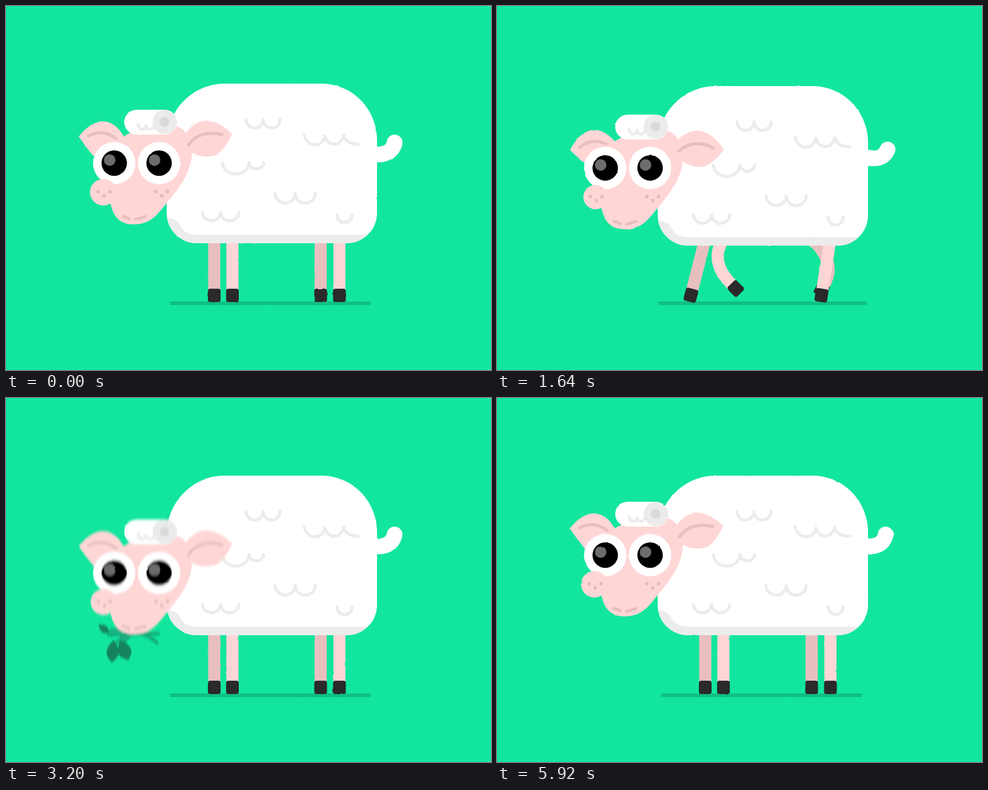
These frames come from a looping animation (800x600 px, 5960 ms). An HTML page:

```html
<!DOCTYPE html>
<html lang="en">
<head>
<meta charset="utf-8">
<title>Sheep</title>
<style>
  html, body { margin: 0; width: 100%; height: 100%; overflow: hidden; background: #12e69e; }
  svg { display: block; width: 800px; height: 600px; }
  .line { fill: none; stroke-linecap: round; stroke-linejoin: round; }
  .wool { stroke: #ececec; stroke-width: 5; }
  .crease { stroke: #e8bfbf; stroke-width: 5; }
  .skin { fill: #ffd6d6; }
  .leaf { fill: #14825f; }
  .stem { stroke: #12ab7d; stroke-width: 6; }
  .ground { stroke: #10bd86; stroke-width: 6; }
</style>
</head>
<body>
<svg viewBox="0 0 800 600">
  <defs>
    <filter id="rough" filterUnits="userSpaceOnUse" x="100" y="110" width="575" height="440" color-interpolation-filters="sRGB">
      <feTurbulence id="noise" type="fractalNoise" baseFrequency=".14" numOctaves="1" result="n"/>
      <feDisplacementMap in="SourceGraphic" in2="n" scale="2.2" xChannelSelector="R" yChannelSelector="G"/>
      <feGaussianBlur stdDeviation=".5"/>
    </filter>
    <filter id="speed" filterUnits="userSpaceOnUse" x="80" y="130" width="330" height="330">
      <feGaussianBlur id="blur" stdDeviation="0"/>
    </filter>
    <path id="torso" d="M360 128H520C572 128 612 170 612 222V341A50 50 0 0 1 562 391H315A50 50 0 0 1 265 341V225C265 172 308 128 360 128Z"/>
    <clipPath id="inside"><use href="#torso"/></clipPath>
    <g id="dots" fill="#e5baba">
      <circle cx="-10" cy="-3.5" r="3"/><circle cy="3.5" r="3"/><circle cx="9.5" cy="-3.5" r="3"/>
    </g>
    <g id="eye">
      <circle r="35" fill="#fff"/><circle r="21"/><circle cx="-7.5" cy="-5" r="9.5" fill="#6c6c6c"/>
    </g>
    <path id="leaf" class="leaf" d="M0-18Q13-4 9 8Q6 14 0 19Q-6 14-9 8Q-13-4 0-18Z"/>
  </defs>

  <g filter="url(#rough)">
    <path id="ground" class="line ground"/>
    <path id="patch" class="line ground"/>
    <g id="legs"></g>
    <g id="body">
      <path id="tail" class="line" d="M606 244.500Q637 247 641 225" stroke="#fff" stroke-width="26"/>
      <use href="#torso" fill="#fff"/>
      <path clip-path="url(#inside)" fill="#ececec" d="M260 349Q282 350 287 361Q294 377 315 377H620V400H260Z"/>
      <g id="fleece" class="line wool">
        <path d="M492 212C495 234 523 234 526 214C530 232 553 233 557 213Q561 228 582 228"/>
      </g>
    </g>
    <g id="head">
      <g id="grass">
        <path class="line stem" d="M251 359L170 361M249 374Q222 350 173 354M214 346L178 378M216 350L193 374"/>
        <use href="#leaf" transform="translate(161 351) rotate(-52) scale(.6)"/>
        <use href="#leaf" transform="translate(176 388) rotate(4)"/>
        <use href="#leaf" transform="translate(195 386) rotate(-22) scale(1.1 .95)"/>
      </g>
      <g id="earL">
        <path class="skin" d="M120 215Q139 191 160 190Q181 191 195 216Q182 244 146 250Q130 230 120 215Z"/>
        <path class="line crease" d="M136 214Q162 201 183 220"/>
      </g>
      <path class="skin" d="M193 216Q205 206 240 198Q275 192 290 202Q304 212 306.500 240C307 268 293 292 265 325C250 343 240 360 210 360C187 360 177 346 173 328L148 262C147 238 170 224 193 216Z"/>
      <g id="earR">
        <path class="skin" d="M373 211Q352 190 330 189Q308 190 292 216L301 238Q320 253 346 246Q362 236 373 211Z"/>
        <path class="line crease" d="M301 229Q320 203 356 212"/>
      </g>
      <rect x="195" y="171" width="87" height="41" rx="20.5" fill="#fff"/>
      <path class="line wool" d="M218 195C219 206 231 205 231 197C232 206 244 205 245 195"/>
      <circle cx="262" cy="191" r="20" fill="#ebebeb"/>
      <circle cx="261.500" cy="191" r="8" fill="#dadada"/>
      <use href="#eye" x="178.500" y="259"/>
      <use href="#eye" x="252.500" y="259"/>
      <g id="nose">
        <circle id="snout" class="skin" r="22"/>
        <use href="#dots" x="1.500" y="2.500"/>
      </g>
      <use href="#dots" x="257" y="309.500"/>
      <path class="line crease" d="M193 347Q198 348 203 351M214 351.500Q222 350 229 347"/>
    </g>
  </g>
</svg>
<script>
const LOOP = 5960, TAU = Math.PI * 2;
const $ = id => document.getElementById(id);
const set = (el, attrs) => { for (const k in attrs) el.setAttribute(k, attrs[k]); };
const add = (parent, tag, attrs) => {
  const el = document.createElementNS("http://www.w3.org/2000/svg", tag);
  set(el, attrs);
  return parent.appendChild(el);
};
const ramp = (t, a, b) => Math.min(1, Math.max(0, (t - a) / (b - a)));
const ease = (t, a, b) => (1 - Math.cos(Math.PI * ramp(t, a, b))) / 2;
const bump = (t, a, b) => Math.sin(Math.PI * ramp(t, a, b)) ** 2;

// Wool marks: x, y, depth, then the width of each scallop
[[396, 187, 14, 28, 28], [357, 258, 19, 44, 24], [444, 309, 16, 33, 33],
 [324, 340, 14, 30, 30], [546, 344, 13, 25]].forEach(([x, y, depth, ...widths]) =>
  add($("fleece"), "path", {
    d: `M${x} ${y}` + widths.map(w => `a${w / 2} ${depth * Math.min(1, w / widths[0])} 0 0 0 ${w} 0`).join("")
  }));

// Diagonal pairs step together; side is the direction in which the knee bends
const legs = [
  { x: 343.5, side: -1, shift: 0, color: "#e8bfbf" },
  { x: 519, side: 1, shift: .5, color: "#e8bfbf" },
  { x: 373.5, side: -1, shift: .5, color: "#ffd6d6" },
  { x: 550, side: 1, shift: 0, color: "#ffd6d6" }
];
for (const leg of legs) {
  leg.limb = add($("legs"), "path", { fill: "none", stroke: leg.color, "stroke-width": 20 });
  leg.hoof = add($("legs"), "rect", { x: -10.5, y: -1, width: 21, height: 22, rx: 4, fill: "#2a2a2a" });
}

function poseLeg(leg, phase, walk, bob) {
  const a = TAU * (phase + leg.shift);
  const lift = 12 * walk * Math.max(0, -Math.sin(a));
  const hipY = 380 + bob;
  const x = leg.x + walk * (4.5 * leg.side - 31 * Math.cos(a)), y = 467 - lift;
  const kneeX = (leg.x + x) / 2 + leg.side * lift * 3.7, kneeY = (hipY + y) / 2;
  const turn = -Math.atan2(x - kneeX, y - kneeY) * 360 / TAU;
  set(leg.limb, { d: `M${leg.x} ${hipY}Q${kneeX} ${kneeY} ${x} ${y}` });
  set(leg.hoof, { transform: `translate(${x} ${y}) rotate(${turn})` });
}

const headDrop = t => 129 * (ease(t, 1850, 2140) - ease(t, 2900, 3340));

function render(t) {
  // Two full strides, from standing to standing
  const phase = .25 + ramp(t, 0, 1800) + ease(t, 0, 1800);
  const walk = ease(t, 0, 250) * (1 - ease(t, 1580, 1860));
  const bob = 3.35 * walk * (1 + Math.cos(2 * TAU * (phase - .045)));
  const wag = 10 * (bump(t, 2440, 3000) + bump(t, 3640, 4200));

  legs.forEach(leg => poseLeg(leg, phase, walk, bob));
  set($("ground"), { d: `M${273 - bob} 490H${599 + 2.2 * bob}` });
  set($("body"), { transform: `translate(0 ${bob})` });
  set($("tail"), { transform: `rotate(${3 * bob + wag} 606 244)` });

  const near = ease(t, 2080, 2150) * (1 - ease(t, 2920, 3020));
  set($("patch"), { d: `M${237 - 12 * near} 490H${237 + 12 * near}`, opacity: near });

  const tilt = ease(t, 1850, 2140) - ease(t, 2900, 3190);
  const drop = headDrop(t);
  set($("head"), {
    transform: `translate(${5 * tilt} ${drop + 2 * bob}) rotate(${-11 * tilt} 215.5 259)`
  });
  const speed = Math.abs(headDrop(t + 10) - headDrop(t - 10)) / 20;
  if (speed > .04) {
    set($("blur"), { stdDeviation: `.6 ${speed * 6}` });
    set($("head"), { filter: "url(#speed)" });
  } else $("head").removeAttribute("filter");

  set($("earL"), { transform: `rotate(${-3 * bob} 190 220)` });
  set($("earR"), { transform: `rotate(${3 * bob} 290 225)` });

  const sniff = Math.sin(Math.PI * 9 * t / LOOP) ** 2;
  set($("nose"), { transform: `translate(${160.5 + 2 * sniff} 307)` });
  set($("snout"), { r: 22 - 2 * sniff });

  // Grass pops out at the bite, then is chewed into the mouth
  const eaten = ramp(t, 3500, 5960);
  const size = ease(t, 2180, 2360) * Math.max(0, 1 - .93 * eaten);
  const swing = -75 * eaten + 4 * Math.sin(TAU * t / 400) * ramp(t, 3400, 3600);
  set($("grass"), {
    transform: `translate(208 352) rotate(${swing}) scale(${size}) translate(-208 -352)`,
    visibility: size > .2 ? "visible" : "hidden"
  });

  set($("noise"), { seed: 1 + Math.floor(t / 80) });
}

const start = performance.now();
function frame() {
  render((performance.now() - start) % LOOP);
  requestAnimationFrame(frame);
}
frame();
</script>
</body>
</html>
```
